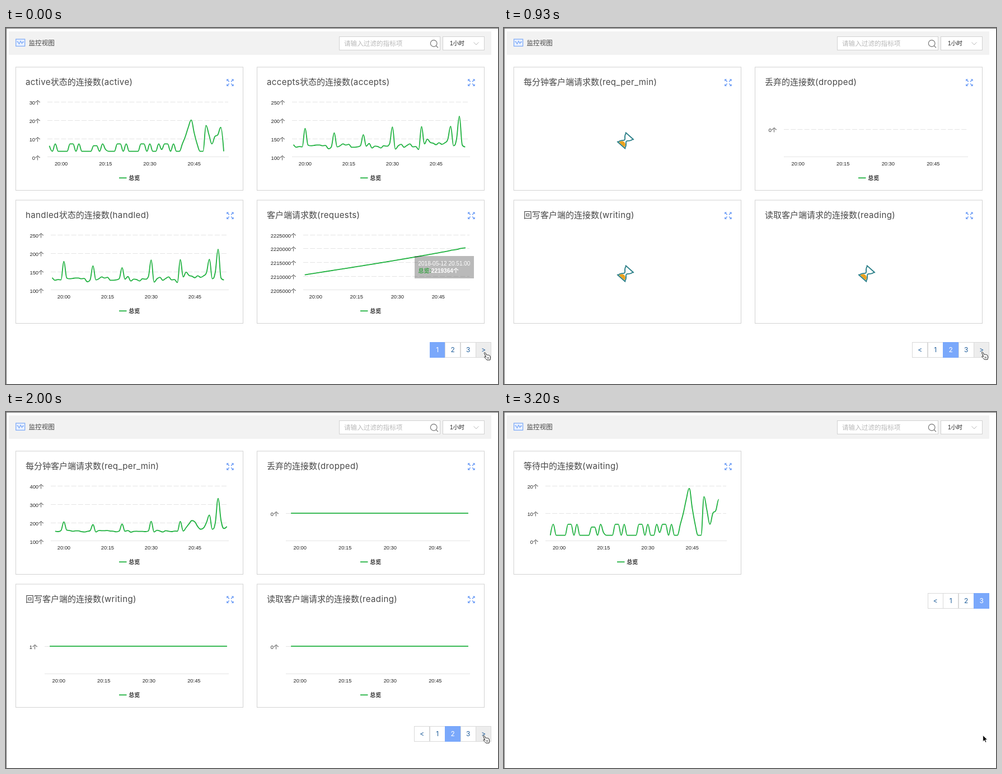
These frames come from a looping animation (879 by 637 pixels, 3.27 s). An HTML page:

```html
<!DOCTYPE html>
<html lang="zh-CN">
<head>
<meta charset="utf-8">
<title>监控视图</title>
<style>
  html, body { margin: 0; width: 100%; height: 100%; overflow: hidden; background: #fff; }
  svg { display: block; }
  text { font-family: Inter, "Noto Sans CJK SC", "Noto Sans CJK", sans-serif; fill: #444; }
  .title { font-size: 15px; fill: #484848; }
  .latin { letter-spacing: .4px; }
  .axis, .tip text { font-family: "Liberation Sans", "Noto Sans CJK SC", "Noto Sans CJK", sans-serif; }
  .axis { font-size: 9.3px; fill: #222; }
  .legend { font-size: 10px; font-weight: 700; fill: #333; }
  .tip text { font-size: 10px; fill: #fff; }
  .mid { text-anchor: middle; }
  .end { text-anchor: end; }
  .box { fill: #fff; stroke: #d2d2d2; }
  .grid { stroke: #e4e4e4; }
  .dash { stroke-dasharray: 9 3.2; }
  .line { fill: none; stroke: #1fb13f; stroke-width: 1.8; stroke-linejoin: round; }
  .page { font-size: 12px; fill: #23609c; }
</style>
</head>
<body>
<svg id="stage" width="879" height="637" viewBox="0 0 879 637">
  <defs>
    <g id="expand" fill="#6f9ef6" stroke="#6f9ef6" stroke-width="1.5">
      <g id="corner"><path d="M-6.3-6.3H-2.2L-6.3-2.2Z" stroke="none"/><path d="M-5-5L-1.7-1.7"/></g>
      <use href="#corner" transform="rotate(90)"/>
      <use href="#corner" transform="rotate(180)"/>
      <use href="#corner" transform="rotate(270)"/>
    </g>
    <g id="glass">
      <path d="M-6.5 10C-6.3 6-3.5 3.4 0 3.4S6.3 6 6.5 10Z" fill="#eba21f"/>
      <path d="M-10-11H10M-10 11H10M-8-11C-8-4-2-3-2 0S-8 4-8 11M8-11C8-4 2-3 2 0S8 4 8 11"
        fill="none" stroke="#2b7f88" stroke-width="1.9"/>
    </g>
  </defs>

  <rect x="5" y="6" width="862" height="42" fill="#f2f2f2"/>
  <path d="M0 .5H879M.5 0V637" stroke="#6a6a6a"/>
  <g fill="none" stroke="#7ba8f7">
    <rect x="17.7" y="20" width="16" height="12.5" fill="#e9f1ff" stroke-width="1.2"/>
    <path d="M19.5 24.5H21L23.5 28.5L26 23.5L28.5 27.5L30 25H32" stroke-width="1.3"/>
  </g>
  <text x="40.5" y="31" font-size="11.6">监控视图</text>
  <rect class="box" x="595.5" y="15.5" width="180" height="24"/>
  <text x="604" y="32" font-size="11.6" style="fill:#b9b9b9">请输入过滤的指标项</text>
  <path d="M768.6 32L772 35.4M770 27.5A5.8 5.8 0 1 1 758.4 27.5A5.8 5.8 0 1 1 770 27.5" fill="none" stroke="#777" stroke-width="1.2"/>
  <rect class="box" x="780.5" y="15.5" width="74" height="24"/>
  <text class="axis" x="793" y="31" style="font-size:10.2px">1小时</text>
  <path d="M835.5 25.5L840 30L844.5 25.5" fill="none" stroke="#bbb"/>

  <g id="pages"></g>

  <g id="tip" class="tip">
    <rect x="730" y="408" width="106" height="40" fill-opacity=".27"/>
    <text x="736.5" y="424.5">2018-05-12 20:51:00</text>
    <text x="736.5" y="437.5" font-weight="700"><tspan fill="#3fa34a">总览:</tspan>2219364个</text>
  </g>
  <g id="hand" fill="#fff" stroke="#222" stroke-linejoin="round">
    <path d="M1 1.5C.3.2 2.2-.6 3 .8L5.2 4.8C5.6 4 6.8 4 7.2 5C7.8 4.3 8.9 4.5 9.2 5.4C10 4.9 11 5.3 11.3 6.4L12 9.5C12.2 11 11.6 12.2 11.4 13.5H5.6C4.8 12 3 10.6 1.6 9.2C.6 8 1.6 7 2.8 7.6L4.2 8.6Z"/>
    <path d="M6.4 8.6L7.3 11.4M8.3 8.3L9.1 11.2" stroke-width=".8"/>
  </g>
  <path id="arrow" transform="translate(855.7 578.5)" stroke="#fff" stroke-width=".8"
    d="M0 0V11.2L2.6 8.8L4.4 12.8L6.2 12L4.5 8.1H8Z"/>
</svg>
<script>
const LOOP = 3270, TO_SECOND = 800, TO_THIRD = 2200, DRAW = 1020;
const COL = 431, ROW = 238, TOP = 131.6, BASE = 230.5, RIGHT = 398;
const $ = id => document.getElementById(id);

function add(parent, tag, attrs = {}, text) {
  const el = document.createElementNS('http://www.w3.org/2000/svg', tag);
  for (const k in attrs) el.setAttribute(k, attrs[k]);
  if (text !== undefined) el.textContent = text;
  return parent.appendChild(el);
}
const show = (el, on) => el.setAttribute('display', on ? 'inline' : 'none');

// Per-minute samples
const waiting = [5,2,6,2,2,2,2,6,6,2,6,2,2,2,2,5,5,2,6,3,2,2,2,6,6,2,6,2,2,2,
  2,6,6,2,6,2,2,6,3,6,6,2,6,2,2,6,10,15,19,12,6,2,2,16,11,6,10,11,15,2];
const accepts = [133,126,128,127,177,132,130,131,132,132,130,131,122,127,165,127,130,135,132,134,
  126,126,127,130,160,129,136,124,129,128,124,130,129,135,181,121,130,134,126,131,
  135,127,128,120,182,135,148,139,137,133,138,134,138,147,183,130,147,210,132,127];
const perMinute = [152,150,156,203,158,156,152,154,154,150,148,151,155,188,148,156,155,155,156,153,
  152,149,153,191,152,156,147,151,152,151,151,150,153,206,148,157,153,148,155,152,
  150,153,152,205,153,172,192,210,203,177,163,170,200,240,163,196,330,210,167,178];
const minutes = Array.from({ length: 60 }, (_, i) => i);
const requests = minutes.map(i => {
  const f = i / 59;
  return 2210450 + 9000 * f + 800 * f ** 3 + (i > 53 ? 70 * Math.sin(i * 2) : 0);
});

// Plot shapes: left edge, x of 20:00, px per minute, minutes before 20:00
const narrow = { left: 74, zero: 98.6, step: 5.28, lead: 4 };
const medium = { left: 80, zero: 103.4, step: 5.2, lead: 4 };
const wide = { left: 100, zero: 122.2, step: 4.87, lead: 4 };
const flat = { left: 69, zero: 94.2, step: 5.37, lead: 3, lo: 0, hi: 2 };

const charts = [
  [
    { ...narrow, title: 'active状态的连接数(active)', ticks: [30, 20, 10, 0], data: waiting.map(v => v + 1) },
    { ...medium, title: 'accepts状态的连接数(accepts)', ticks: [250, 200, 150, 100], data: accepts },
    { ...medium, title: 'handled状态的连接数(handled)', ticks: [250, 200, 150, 100], data: accepts },
    { ...wide, title: '客户端请求数(requests)', ticks: [2225000, 2220000, 2215000, 2210000, 2205000], data: requests }
  ],
  [
    { ...medium, lead: 3, title: '每分钟客户端请求数(req_per_min)', ticks: [400, 300, 200, 100], data: perMinute, start: 990 },
    { ...flat, title: '丢弃的连接数(dropped)', ticks: [0], data: minutes.map(() => 1), start: 895 },
    { ...flat, title: '回写客户端的连接数(writing)', ticks: [1], data: minutes.map(() => 1), start: 1000 },
    { ...flat, title: '读取客户端请求的连接数(reading)', ticks: [0], data: minutes.map(() => 1), start: 980 }
  ],
  [
    { ...narrow, lead: 3, title: '等待中的连接数(waiting)', ticks: [20, 10, 0], data: waiting.slice(1), start: 2317 }
  ]
];

// Smooth curve whose handles never overshoot a neighbouring sample
function spline(pts) {
  let d = `M${pts[0]}`, out = pts[0];
  for (let i = 1; i < pts.length; i++) {
    const [x, y] = pts[i], [px, py] = pts[i - 1], next = pts[i + 1];
    let inn = [x, y], nextOut = [x, y];
    if (next) {
      const [nx, ny] = next, mix = (a, b) => (1.5 * a + b) / 2.5;
      const lx = mix(x, px), rx = mix(x, nx);
      let ly = mix(y, py), ry = mix(y, ny);
      const fix = (ry - ly) * (rx - x) / (rx - lx) + y - ry;
      ly += fix;
      ry += fix;
      const clamp = (v, a, b) => Math.min(Math.max(v, Math.min(a, b)), Math.max(a, b));
      const l = clamp(ly, py, y);
      if (l !== ly) { ly = l; ry = 2 * y - ly; }
      const r = clamp(ry, ny, y);
      if (r !== ry) { ry = r; ly = 2 * y - ry; }
      inn = [lx, ly];
      nextOut = [rx, ry];
    }
    d += `C${out} ${inn} ${x},${y}`;
    out = nextOut;
  }
  return d;
}

function buildCard(page, c, i, id) {
  const card = add(page, 'g', { transform: `translate(${i % 2 * COL} ${(i >> 1) * ROW})` });
  add(card, 'rect', { class: 'box', x: 17.5, y: 70, width: 406, height: 220.5 });
  const title = add(card, 'text', { class: 'title', x: 35, y: 101.5 });
  for (const run of c.title.match(/[\x20-\x7e]+|[^\x20-\x7e]+/g))
    add(title, 'tspan', run.charCodeAt(0) < 128 ? { class: 'latin' } : {}, run);
  add(card, 'use', { href: '#expand', x: 400.4, y: 97.8 });

  c.spinner = add(card, 'use', { href: '#glass' });
  const plot = c.plot = add(card, 'g');
  const n = c.ticks.length, lo = c.lo ?? c.ticks[n - 1], hi = c.hi ?? c.ticks[0];
  const yOf = v => BASE - (v - lo) / (hi - lo) * (BASE - TOP);
  c.ticks.forEach((v, k) => {
    const y = n > 1 ? yOf(v) : yOf(1);
    if (n === 1 || k < n - 1)
      add(plot, 'path', { class: 'grid dash', d: `M${c.left} ${Math.round(y) + .5}H${RIGHT - 1}` });
    add(plot, 'text', { class: 'axis end', x: c.left - 12.7, y: y + 5.1 }, v + '个');
  });
  add(plot, 'path', { class: 'grid', d: `M${c.left} ${BASE}H${RIGHT}` });
  for (let k = 0; k < 4; k++)
    add(plot, 'text', { class: 'axis mid', x: c.zero + k * 15 * c.step, y: 246.3 }, '20:' + String(k * 15).padStart(2, '0'));

  const clip = add(plot, 'clipPath', { id });
  c.clip = add(clip, 'rect', { x: c.left, y: 120, width: RIGHT - c.left, height: 115 });
  const pts = c.data.map((v, k) => [c.zero + (k - c.lead) * c.step, yOf(v)].map(p => +p.toFixed(2)));
  add(plot, 'path', { class: 'line', d: spline(pts), 'clip-path': `url(#${id})` });
  add(plot, 'path', { class: 'line', d: 'M202 268.3H215.5' });
  add(plot, 'text', { class: 'legend', x: 219.3, y: 272 }, '总览');
}

function buildPager(page, labels, active, y) {
  const w = 27.5, left = 867 - w * labels.length;
  [...labels].forEach((s, i) => {
    const x = left + i * w, on = +s === active;
    const fill = on ? '#7aa8fb' : s === '>' ? '#ededed' : '#fff';
    add(page, 'rect', { x: Math.floor(x) + .5, y: y + .5, width: 27, height: 27, fill, stroke: on ? fill : '#d9d9d9' });
    add(page, 'text', { class: 'page mid', x: x + w / 2, y: y + 18, style: on ? 'fill:#fff' : '' }, s);
  });
}

const pages = charts.map((list, p) => {
  const page = add($('pages'), 'g');
  list.forEach((c, i) => buildCard(page, c, i, `clip${p}${i}`));
  buildPager(page, ['123>', '<123>', '<123'][p], p + 1, p < 2 ? 562 : 324);
  return page;
});

function render(t) {
  const current = t < TO_SECOND ? 0 : t < TO_THIRD ? 1 : 2;
  const opened = [0, TO_SECOND, TO_THIRD][current];
  pages.forEach((p, i) => show(p, i === current));

  for (const c of charts[current]) {
    const start = c.start ?? -DRAW;
    const p = Math.min(Math.max((t - start) / DRAW, 0), 1);
    c.clip.setAttribute('width', (RIGHT - c.left) * (.5 - Math.cos(Math.PI * p) / 2));
    show(c.plot, t >= start);
    show(c.spinner, t < start);
    c.spinner.setAttribute('transform', `translate(217 201.5) rotate(${18 + (t - opened) * .18})`);
  }

  show($('tip'), t < 199);
  $('tip').setAttribute('opacity', t < 66 ? 1 : .45);
  const [hx, hy] = t < 199 ? [853.5, 580.5] : t < 1130 ? [852.6, 579.6] : [851.7, 578.8];
  $('hand').setAttribute('transform', `translate(${hx} ${hy})`);
  show($('hand'), t < 2260);
  show($('arrow'), t >= 2260);
}

// The picture advances 15 times a second
const origin = performance.now();
function frame() {
  const t = (performance.now() - origin) % LOOP;
  render(Math.floor(t * .015 + .06) / .015 + .01);
  requestAnimationFrame(frame);
}
frame();
</script>
</body>
</html>
```
